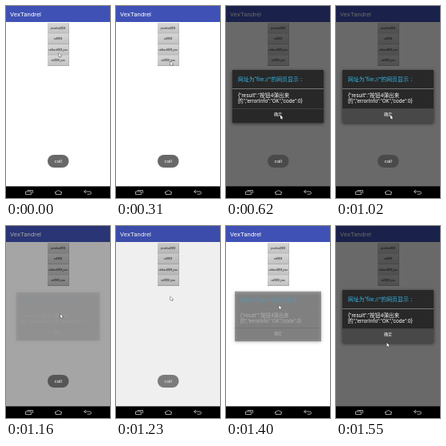
An HTML page with a canvas for the animation above (1.61 s loop, 130 px wide and 240 px high).

```html
<!DOCTYPE html>
<html lang="zh">
<head>
<meta charset="utf-8">
<style>
html, body { margin: 0; width: 100%; height: 100%; overflow: hidden; background: #fff; }
canvas { display: block; width: 130px; height: 240px; }
</style>
</head>
<body>
<canvas id="stage"></canvas>
<script>
const W = 130, H = 240, LOOP = 1610, STEP = 76.8;
const SANS = 'Roboto, "Noto Sans CJK SC", "Noto Sans CJK", sans-serif';
const canvas = document.getElementById('stage');
const dpr = window.devicePixelRatio || 1;
canvas.width = W * dpr;
canvas.height = H * dpr;
const c = canvas.getContext('2d');

// Progress from 0 to 1 between two times.
const ramp = (t, from, to) => Math.min(1, Math.max(0, (t - from) / (to - from)));

function rect(x, y, w, h, fill) {
  c.fillStyle = fill;
  c.fillRect(x, y, w, h);
}

function text(str, x, y, size, fill, align = 'left') {
  c.font = `${size}px ${SANS}`;
  c.textAlign = align;
  c.fillStyle = fill;
  c.fillText(str, x, y);
}

function path(d, x, y) {
  const p = new Path2D();
  p.addPath(new Path2D(d), new DOMMatrix([1, 0, 0, 1, x, y]));
  return p;
}

function drawPage() {
  rect(0, 0, W, H, '#fff');
  rect(0, 0, W, 20, '#3f51b5');
  text('VexTandrel', 5, 12.7, 7.9, '#fff');
  const labels = ['jsmethod按钮', 'call按钮', 'callback按钮_java', 'call按钮_java'];
  labels.forEach((label, i) => {
    const y = 21 + i * 13.5;
    const g = c.createLinearGradient(0, y, 0, y + 13);
    g.addColorStop(0, '#d6d6d6');
    g.addColorStop(1, '#c2c2c2');
    rect(52, y, 27, 13.5, '#a4a4a4');
    rect(52, y, 26.5, 12.8, g);
    text(label, 65, y + 7.6, 3, '#222', 'center');
  });
}

function drawNav() {
  rect(0, 225.4, W, H - 225.4, '#000');
  c.strokeStyle = '#c4c4c4';
  c.lineWidth = 0.8;
  c.stroke(path('M0 0h7v3.5h-7zM2 -1.5h7v3.5', 24.5, 232));
  c.stroke(path('M0 0L4.5 -2.5L9 0H8V2.5H1V0z', 61, 233));
  c.stroke(path('M2.5 -2L0 0L2.5 2M0 0H7.5Q9 0 9 1.6T7.5 3.2H4', 97.5, 232));
}

function drawDialog(shown, pressed) {
  const scale = 0.91 + 0.09 * shown;
  c.save();
  c.globalAlpha = shown;
  c.translate(65, 113);
  c.scale(scale, scale);
  c.translate(-65, -113);
  c.shadowColor = 'rgba(0,0,0,.6)';
  c.shadowBlur = 4 * dpr;
  c.shadowOffsetY = dpr;
  rect(8, 80, 114, 66, '#282828');
  c.shadowColor = 'transparent';
  if (pressed) rect(8, 128.5, 114, 17.5, '#484848');
  text('网址为“file://”的网页显示 ：', 15, 93.6, 6.9, '#33b5e5');
  rect(8, 103, 114, 0.8, '#8b8b8b');
  text('{"result":"按钮4弹出来', 15, 113.7, 6.7, '#f4f4f4');
  text('的","errorInfo":"OK","code":0}', 15, 121.2, 6.7, '#f4f4f4');
  rect(8, 128, 114, 0.6, '#505050');
  text('确定', 65, 137.3, 5.1, '#f4f4f4', 'center');
  c.restore();
}

function drawToast(alpha) {
  c.save();
  c.globalAlpha = alpha;
  c.fillStyle = 'rgba(66,66,66,.8)';
  c.beginPath();
  c.roundRect(52, 186, 26.5, 16, 8);
  c.fill();
  text('call', 65.2, 196.3, 6, '#f5f5f5', 'center');
  c.restore();
}

function drawCursor(x, y) {
  const arrow = path('M0 0V4.6L1.1 3.7L1.9 5.2L2.7 4.8L2 3.3L3.4 3.2z', x, y);
  c.lineWidth = 0.7;
  c.strokeStyle = '#222';
  c.stroke(arrow);
  c.fillStyle = '#fff';
  c.fill(arrow);
}

function draw(now) {
  // The screen refreshes in even steps.
  const t = Math.floor((now % LOOP) / STEP) * STEP;

  // Dialog opens, closes, then opens again; the dimming trails behind it.
  const shown = ramp(t, 360, 510) - ramp(t, 1075, 1160) + ramp(t, 1320, 1470);
  const dim = ramp(t, 424, 574) - ramp(t, 1090, 1245) + ramp(t, 1384, 1534);
  const pressed = (t > 990 && t < 1100) || t > 1500;

  // Pointer: to the button, to the dialog, back, and down again.
  const hover = ramp(t, 0, 154);
  const visit = ramp(t, 470, 614) - ramp(t, 1060, 1295);
  const again = ramp(t, 1320, 1480);

  c.setTransform(dpr, 0, 0, dpr, 0, 0);
  drawPage();
  rect(0, 0, W, 226, `rgba(0,0,0,${0.59 * dim})`);
  drawDialog(shown, pressed);
  drawToast(1 - ramp(t, 1200, 1382));
  drawNav();
  drawCursor(66 + 2 * hover - 4.5 * again, 59 + 10.5 * hover + 67 * visit + 76.5 * again);
}

const start = performance.now();
function loop() {
  draw(performance.now() - start);
  requestAnimationFrame(loop);
}
loop();
</script>
</body>
</html>
```
